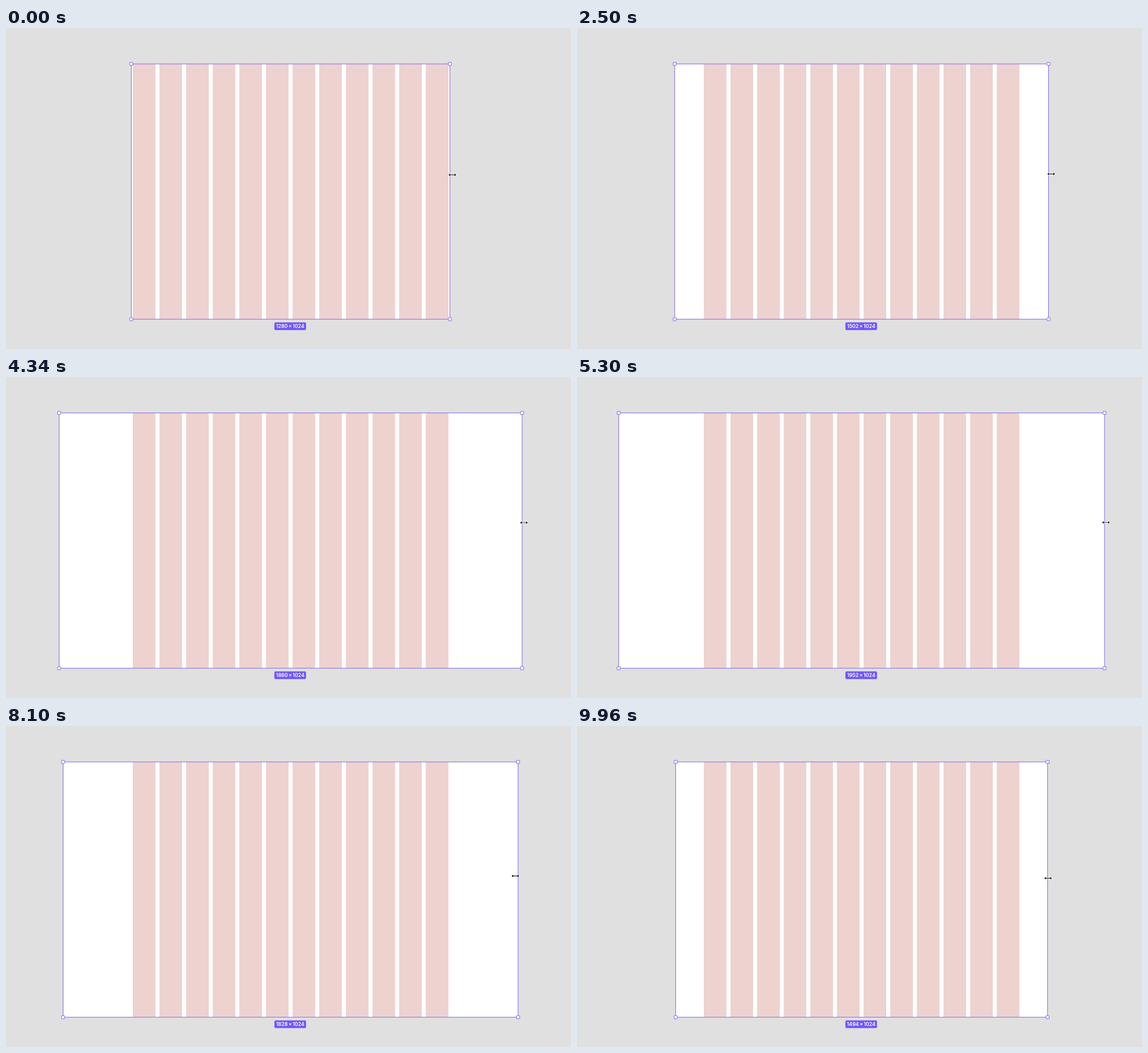
These frames come from a looping animation (994 px wide and 564 px high, 9980 ms). An HTML page:

```html
<!DOCTYPE html>
<html lang="en">
<head>
<meta charset="utf-8">
<title>Column grid resize</title>
<style>
  html, body { margin: 0; width: 100%; height: 100%; overflow: hidden; background: #e0e0e0; }
  svg { display: block; }
  .edge { stroke: #7561ee; stroke-width: 0.95; }
  text { font: 600 8.8px Inter, sans-serif; word-spacing: -0.9px; fill: #fff; text-anchor: middle; }
</style>
</head>
<body>
<svg width="994" height="564" viewBox="0 0 994 564">
  <rect id="frame" y="63.1" height="448.6" fill="#fff"/>
  <g id="columns" fill="#edd2cf"></g>
  <rect id="outline" class="edge" y="63.1" height="448.6" fill="none"/>
  <g id="handles" class="edge" fill="#fff"></g>
  <rect x="472.2" y="517.3" width="55.6" height="13.4" rx="2" fill="#6f57fb"/>
  <text id="label" x="500" y="527.2"></text>
  <path id="cursor" d="M-6.5 0L-4 -2.4V-.45H4V-2.4L6.5 0L4 2.4V.45H-4V2.4Z"
        stroke="#fff" stroke-width="1.2" paint-order="stroke"/>
</svg>
<script>
const LOOP = 9980, TICK = 20, CENTER = 500.7, SCALE = 0.4379;
const TOP = 63.1, HEIGHT = 448.6, HANDLE = 5.5;
const COLUMNS = 12, COLUMN = 91, GUTTER = 16;
const START_WIDTH = 1280;

// Each pull: start time, end time, width reached; the frame rests in between
const pulls = [
  [680, 1660, 1440], [1660, 2500, 1502], [2500, 3380, 1732], [3480, 3660, 1806],
  [3760, 4200, 1860], [4340, 5300, 1952], [5300, 5760, 2002], [6020, 6560, 2016],
  [6860, 7120, 1962], [7120, 8100, 1828], [8100, 8840, 1655], [8940, 9920, 1494]
];

// Hand drift: time, cursor offset from the right edge, cursor height
const drift = [
  [0, 4.3, 258], [2500, 4.6, 256.5], [5300, 2.5, 255.6],
  [7120, -1.2, 258.7], [8100, -4.8, 263.5], [LOOP, 1, 267.5]
];

const $ = id => document.getElementById(id);
const mix = (a, b, k) => a + (b - a) * k;
const progress = (t, from, to) => Math.min(1, Math.max(0, (t - from) / (to - from)));

function addRect(parent, attrs) {
  const rect = document.createElementNS("http://www.w3.org/2000/svg", "rect");
  for (const name in attrs) rect.setAttribute(name, attrs[name]);
  return parent.appendChild(rect);
}

const gridWidth = COLUMNS * COLUMN + (COLUMNS - 1) * GUTTER;
for (let i = 0; i < COLUMNS; i++) {
  addRect($("columns"), {
    x: CENTER + (i * (COLUMN + GUTTER) - gridWidth / 2) * SCALE,
    y: TOP, width: COLUMN * SCALE, height: HEIGHT
  });
}

// Even handles are on the left edge, odd ones on the right
const handles = [0, 0, HEIGHT, HEIGHT].map(y => addRect($("handles"),
  { y: TOP + y - HANDLE / 2, width: HANDLE, height: HANDLE, rx: 0.6 }));

function frameWidth(t) {
  const width = pulls.reduce((w, [from, to, goal]) => mix(w, goal, progress(t, from, to)), START_WIDTH);
  return Math.round(width / 2) * 2;
}

function handDrift(t) {
  const i = drift.findIndex(([time]) => time > t);
  const [t0, dx0, y0] = drift[i - 1], [t1, dx1, y1] = drift[i];
  const k = progress(t, t0, t1);
  return [mix(dx0, dx1, k), mix(y0, y1, k)];
}

function draw(now) {
  const t = Math.floor((now % LOOP) / TICK) * TICK;
  const width = frameWidth(t);
  const half = width * SCALE / 2;
  const [dx, y] = handDrift(t);
  for (const id of ["frame", "outline"]) {
    $(id).setAttribute("x", CENTER - half);
    $(id).setAttribute("width", half * 2);
  }
  handles.forEach((handle, i) =>
    handle.setAttribute("x", CENTER + (i % 2 ? half : -half) - HANDLE / 2));
  $("label").textContent = `${width} × 1024`;
  $("cursor").setAttribute("transform", `translate(${CENTER + half + dx} ${y})`);
}

const start = performance.now();
function tick() {
  draw(performance.now() - start);
  requestAnimationFrame(tick);
}
tick();
</script>
</body>
</html>
```
